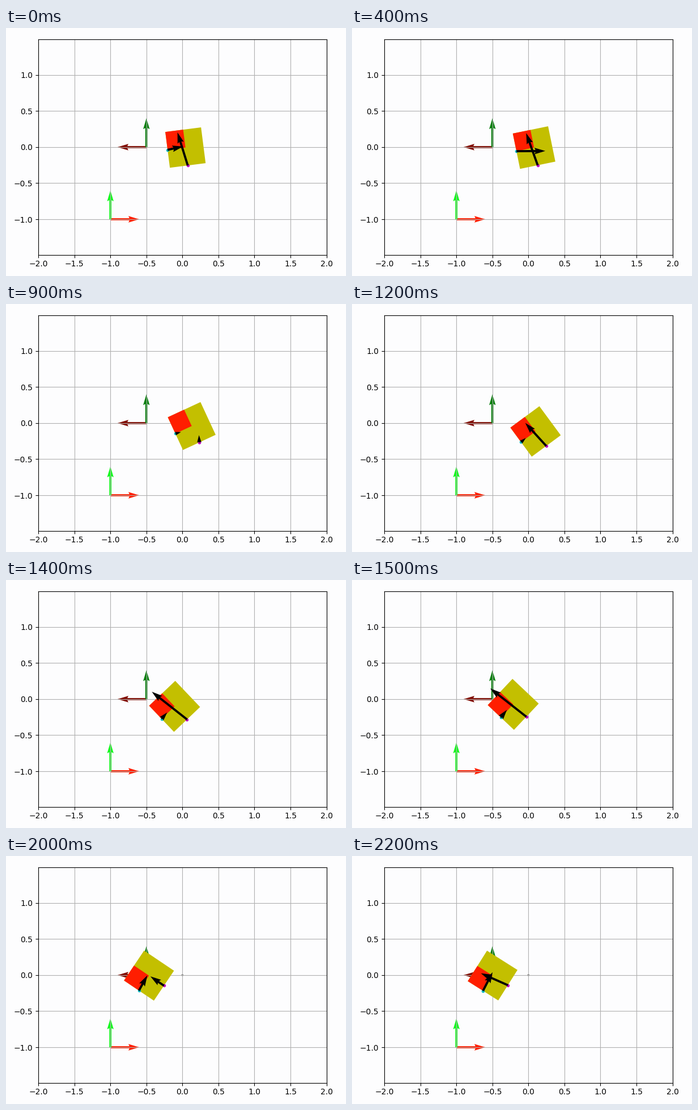
These frames come from a looping animation (600 by 437 pixels, 2300 ms). A matplotlib script:

```python
import numpy as np
import matplotlib.pyplot as plt
from matplotlib.animation import FuncAnimation
from matplotlib.patches import Polygon

W, H, DPI = 600, 437, 100
LEFT, RIGHT, TOP, BOTTOM = 57.1, 565.6, 20.3, 399.5
FRAMES, INTERVAL = 23, 100
HALF = 0.25
PAPER, RED, YELLOW = "#fdfdfe", "#ff1e00", "#c3bf00"
DRIFT = [(0, 0.042), (9, 0.129), (12, 0.099), (15, -0.211), (22, -0.497)]


def bump(t, centre, width, power=2):
    return np.exp(-abs((t - centre) / width) ** power)


def ease_through(t, keys):
    """Monotone cubic through the keys, at rest at both ends."""
    x, y = np.array(keys).T
    h = np.diff(x)
    s = np.diff(y) / h
    m = np.zeros(len(x))
    for i in range(1, len(s)):
        if s[i - 1] * s[i] > 0:
            m[i] = 2 * s[i - 1] * s[i] / (s[i - 1] + s[i])
    k = min(np.searchsorted(x, t, side="right") - 1, len(h) - 1)
    u = (t - x[k]) / h[k]
    ease = u * u * (3 - 2 * u)
    return (y[k] + (y[k + 1] - y[k]) * ease
            + h[k] * u * (1 - u) * ((1 - u) * m[k] - u * m[k + 1]))


def pose(t):
    """Centre and heading: a slow turn with a dip before flying left."""
    x = ease_through(t, DRIFT)
    y = -0.006 - 0.113 * bump(t, 12.6, 3.3)
    heading = 5 + 55 / (1 + np.exp(-0.285 * (t - 11)))
    return x, y, heading


def thrust(t):
    """Power and gimbal angle of the side jet and the bottom jet."""
    side = 0.0015 * t ** 2 + 1.05 * bump(t, 3, 3.74)
    side_gimbal = 5 - 18 * bump(t, 6.3, 4, 4)
    base = (1.2 - 0.95 * bump(t, 9, 2.5) + 0.45 * bump(t, 15, 2.5)
            - 0.75 * bump(t, 19, 2.5))
    base_gimbal = 10 - 35 * bump(t, 8.3, 2.5) - 20 * bump(t, 18, 2.5)
    return (side, side_gimbal), (base, 90 + base_gimbal)


fig = plt.figure(figsize=(W / DPI, H / DPI), dpi=DPI, facecolor=PAPER)
ax = fig.add_axes([LEFT / W, 1 - BOTTOM / H,
                   (RIGHT - LEFT) / W, (BOTTOM - TOP) / H], facecolor=PAPER)
y_max = 2 * (BOTTOM - TOP) / (RIGHT - LEFT)
ax.set_xlim(-2, 2)
ax.set_ylim(-y_max, y_max)
ax.set_xticks(np.arange(-2, 2.1, 0.5))
ax.set_yticks(np.arange(-1, 1.1, 0.5))
ax.grid(True)


def arrow(x, y, u, v, color, z=1):
    return ax.quiver([x], [y], [u], [v], color=color, scale=10,
                     width=0.0075, zorder=z)


def tile(color, z):
    return ax.add_patch(Polygon(np.zeros((4, 2)), fc=color, ec="none", zorder=z))


# Fixed reference axes and the resting dot, all beneath the grid
arrow(-1, -1, 1, 0, RED)
arrow(-1, -1, 0, 1, "#14f81e")
arrow(-0.5, 0, -1, 0, "#800a00")
arrow(-0.5, 0, 0, 1, "#08800e")
arrow(0, 0, 0, 0, "dimgray")

body, quarter = tile(YELLOW, 3), tile(RED, 3.1)
dots = [ax.plot([], [], "o", ms=4, mew=0, color=c, zorder=4)[0]
        for c in ("#10bcc4", "#bc10bc")]
jets = [arrow(0, 0, 0, 0, "black", 5) for _ in dots]

BODY = HALF * np.array([[-1, -1], [1, -1], [1, 1], [-1, 1]])
QUARTER = BODY / 2 + HALF / 2 * np.array([-1, 1])
MOUNTS = HALF * np.array([[-1, 0], [0, -1]])


def update(i):
    x, y, heading = pose(i)
    c, s = np.cos(np.radians(heading)), np.sin(np.radians(heading))

    def place(pts):
        return pts @ np.array([[c, s], [-s, c]]) + (x, y)

    body.set_xy(place(BODY))
    quarter.set_xy(place(QUARTER))
    for dot, jet, p, (power, angle) in zip(dots, jets, place(MOUNTS), thrust(i)):
        a = np.radians(heading + angle)
        dot.set_data([p[0]], [p[1]])
        jet.set_offsets([p])
        jet.set_UVC([power * np.cos(a)], [power * np.sin(a)])
    return [body, quarter, *dots, *jets]


anim = FuncAnimation(fig, update, frames=FRAMES, interval=INTERVAL,
                     repeat=True, repeat_delay=0)
plt.show()
```
